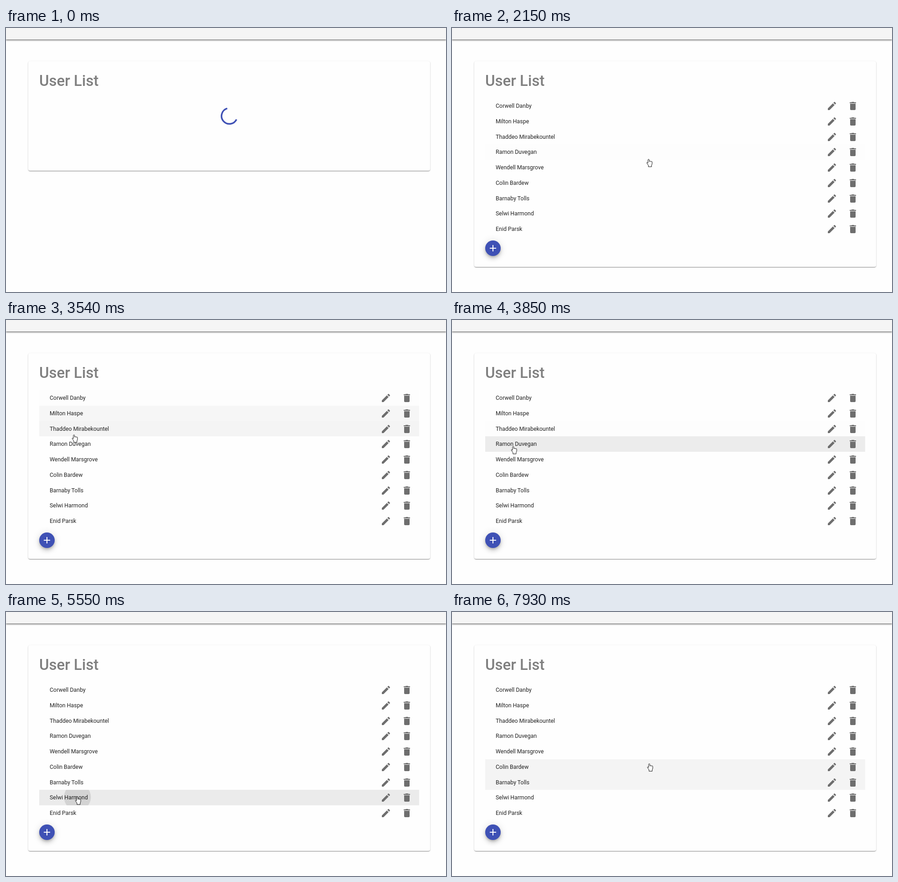
These frames come from a looping animation (967 by 579 pixels, 8000 ms). An HTML page:

```html
<!DOCTYPE html>
<html lang="en">
<head>
<meta charset="utf-8">
<title>User List</title>
<style>
  html, body { margin: 0; width: 100%; height: 100%; overflow: hidden; background: #fefefe; }
  body { position: relative; font-family: Roboto, sans-serif; }
  .bar {
    position: absolute; inset: 0 0 auto; height: 25px; background: #f5f5f5;
    box-shadow: 0 2px 3px rgba(0,0,0,.5);
  }
  .card {
    position: absolute; left: 49px; top: 73px; width: 883px; border-radius: 4px; background: #fefefe;
    box-shadow: 0 2px 1px -1px rgba(0,0,0,.2), 0 1px 1px rgba(0,0,0,.14), 0 1px 3px rgba(0,0,0,.22);
  }
  h1 {
    position: absolute; left: 73px; top: 96px; margin: 0;
    font-size: 33px; font-weight: 500; line-height: 40px; color: #7f7f7f; white-space: nowrap;
  }
  .row { position: absolute; left: 73px; width: 835px; height: 33.75px; overflow: hidden; }
  .row span {
    position: absolute; left: 23px; top: 0; line-height: 33px;
    font-size: 12.4px; color: rgba(0,0,0,.87); white-space: nowrap;
  }
  .row svg { position: absolute; top: 5px; width: 24px; height: 24px; fill: #6e6e6e; }
  .edit { left: 750px; }
  .delete { left: 796px; }
  .ripple {
    position: absolute; left: 83.5px; top: 16px; width: 2px; height: 2px; margin: -1px;
    border-radius: 50%; background: rgba(0,0,0,.1);
  }
  .fab {
    position: absolute; left: 72.75px; top: 465.75px; width: 33.75px; height: 33.75px;
    border-radius: 50%; background: #3f51b5;
    box-shadow: 0 3px 5px -1px rgba(0,0,0,.2), 0 6px 10px rgba(0,0,0,.14), 0 1px 18px rgba(0,0,0,.12);
  }
  .fab svg { position: absolute; left: 4.875px; top: 4.875px; width: 24px; height: 24px; fill: #fff; }
  .spinner { position: absolute; left: 470.5px; top: 173px; width: 40px; height: 40px; }
  .spinner path { fill: none; stroke: #3f51b5; stroke-width: 3.5; }
  .cursor { position: absolute; left: 0; top: 0; width: 20px; height: 22px; overflow: visible; }
  .cursor path { fill: #fff; stroke-linejoin: round; }
  [hidden] { display: none; }
</style>
</head>
<body>
<div class="bar"></div>
<div class="card" id="card"></div>
<h1 id="title">User List</h1>
<svg class="spinner" id="spinner" viewBox="-20 -20 40 40"><path id="arc"/></svg>
<div id="list">
  <div class="fab"><svg viewBox="0 0 24 24"><path d="M19 13h-6v6h-2v-6H5v-2h6V5h2v6h6v2z"/></svg></div>
</div>
<svg class="cursor" id="cursor">
  <path id="arrow" stroke="#3f4660" stroke-width=".9" d="M.5.5V13l3-2.7 2 4.7 2-.9-1.9-4.5h4z"/>
  <path id="hand" stroke="#111" transform="translate(-4 0)"
    d="M4.5.8c-.9 0-1.4.6-1.4 1.4v7L1.9 8C.9 7.3-.1 8.2.6 9.3L4 14v3.2h7V14l1.2-3V6.6c0-1.5-2-1.6-2.2-.4 0-1.4-2-1.7-2.2-.4C7.6 4.5 5.9 4.6 5.9 5.6V2.2C5.9 1.4 5.4.8 4.5.8z"/>
</svg>
<script>
const LOOP = 8000, LOADED = 2150, CLICK = 5500, OPEN = 5640, BACK = 7000;
const ROW_TOP = 154, ROW_HEIGHT = 33.75, FADE = 300, FADE_STEPS = 30;
const EDIT = 'M3 17.25V21h3.75L17.81 9.94l-3.75-3.75L3 17.25zM20.71 7.04c.39-.39.39-1.02 0-1.41l-2.34-2.34c-.39-.39-1.02-.39-1.41 0l-1.83 1.83 3.75 3.75 1.83-1.83z';
const DELETE = 'M6 19c0 1.1.9 2 2 2h8c1.1 0 2-.9 2-2V7H6v12zM19 4h-3.5l-1-1h-5l-1 1H5v2h14V4z';
const names = ['Corwell Danby', 'Milton Haspe', 'Thaddeo Mirabekountel', 'Ramon Duvegan',
  'Wendell Marsgrove', 'Colin Bardew', 'Barnaby Tolls', 'Selwi Harmond', 'Enid Parsk'];

// Where the pointer settles: time, x, y
const stops = [
  [80, 858, 574], [840, 480, 224], [1300, 475, 223], [1680, 438, 223], [2530, 430, 303],
  [2760, 429, 288.7], [3200, 200, 166], [3850, 134, 276], [4390, 117, 427], [4750, 97, 486],
  [5200, 156, 405], [5930, 156, 405], [6700, 390, 190], [7740, 433, 372], [7930, 433, 332]
];

const [card, title, spinner, arc, list, cursor, arrow, hand] =
  ['card', 'title', 'spinner', 'arc', 'list', 'cursor', 'arrow', 'hand']
    .map(id => document.getElementById(id));
const icon = (kind, d) => `<svg class="${kind}" viewBox="0 0 24 24"><path d="${d}"/></svg>`;
const isListed = t => t >= LOADED && (t < OPEN || t >= BACK);

const rows = names.map((name, i) => {
  const row = document.createElement('div');
  row.className = 'row';
  row.style.top = ROW_TOP + i * ROW_HEIGHT + 'px';
  row.innerHTML = `<span>${name}</span>${icon('edit', EDIT)}${icon('delete', DELETE)}`;
  list.append(row);
  return row;
});
const ripple = document.createElement('div');
ripple.className = 'ripple';
rows[7].append(ripple);

// cubic-bezier(.35, 0, .25, 1)
function ease(x) {
  let lo = 0, hi = 1;
  for (let i = 0; i < 20; i++) {
    const s = (lo + hi) / 2, r = 1 - s;
    if (1.05 * r * r * s + .75 * r * s * s + s * s * s < x) lo = s; else hi = s;
  }
  return lo * lo * (3 - 2 * lo);
}

// The arc grows from its tail, then shrinks towards its head.
function drawSpinner(t) {
  const clock = 615 + t * .505, phase = clock % 1000;
  const base = -34 + (clock - 615) * .194 - 90 * Math.floor(clock / 1000);
  const growing = phase < 500, p = ease(phase % 500 / 500);
  const tail = base + (growing ? 0 : 270 * p);
  const head = base + (growing ? 18 + 270 * p : 288);
  const point = a => [Math.cos(a * Math.PI / 180) * 17.3, Math.sin(a * Math.PI / 180) * 17.3].join(' ');
  arc.setAttribute('d', `M${point(tail)}A17.3 17.3 0 ${+(head - tail > 180)} 1 ${point(head)}`);
}

// Each move starts fast and slows into its stop.
function pointerAt(t) {
  const next = stops.findIndex(stop => stop[0] > t);
  if (next < 1) return stops.at(next).slice(1);
  const a = stops[next - 1], b = stops[next];
  const p = 1 - (1 - (t - a[0]) / (b[0] - a[0])) ** 2;
  return [1, 2].map(i => a[i] + (b[i] - a[i]) * p);
}

function drawCursor(t, pointing) {
  const [x, y] = pointerAt(t);
  cursor.style.transform = `translate(${x}px, ${y}px)`;
  cursor.style.visibility = t < stops[0][0] ? 'hidden' : 'visible';
  arrow.style.display = pointing ? 'none' : '';
  hand.style.display = pointing ? '' : 'none';
}

// A row is as dark as the share of the last FADE ms that the pointer spent on it.
function drawRows(t) {
  const shares = names.map(() => 0);
  for (let i = 0; i < FADE_STEPS; i++) {
    const past = t - FADE * i / FADE_STEPS;
    const row = Math.floor((pointerAt(past)[1] - ROW_TOP) / ROW_HEIGHT);
    if (isListed(past) && row in shares) shares[row] += 1 / FADE_STEPS;
  }
  rows.forEach((row, i) => row.style.background = `rgba(0,0,0,${.075 * shares[i]})`);
  const radius = t > CLICK && t < OPEN ? (t - CLICK) * .58 : 0;
  ripple.style.transform = `scale(${radius})`;
}

function draw(t) {
  const loading = t < LOADED, listed = isListed(t);
  card.style.height = (listed ? 450.5 : 240) + 'px';
  title.textContent = loading || listed ? 'User List' : 'User Detail';
  spinner.style.display = loading ? '' : 'none';
  list.hidden = !listed;
  if (loading) drawSpinner(t);
  if (listed) drawRows(t);
  drawCursor(t, listed);
}

const start = performance.now();
function tick() {
  draw((performance.now() - start) % LOOP);
  requestAnimationFrame(tick);
}
tick();
</script>
</body>
</html>
```
